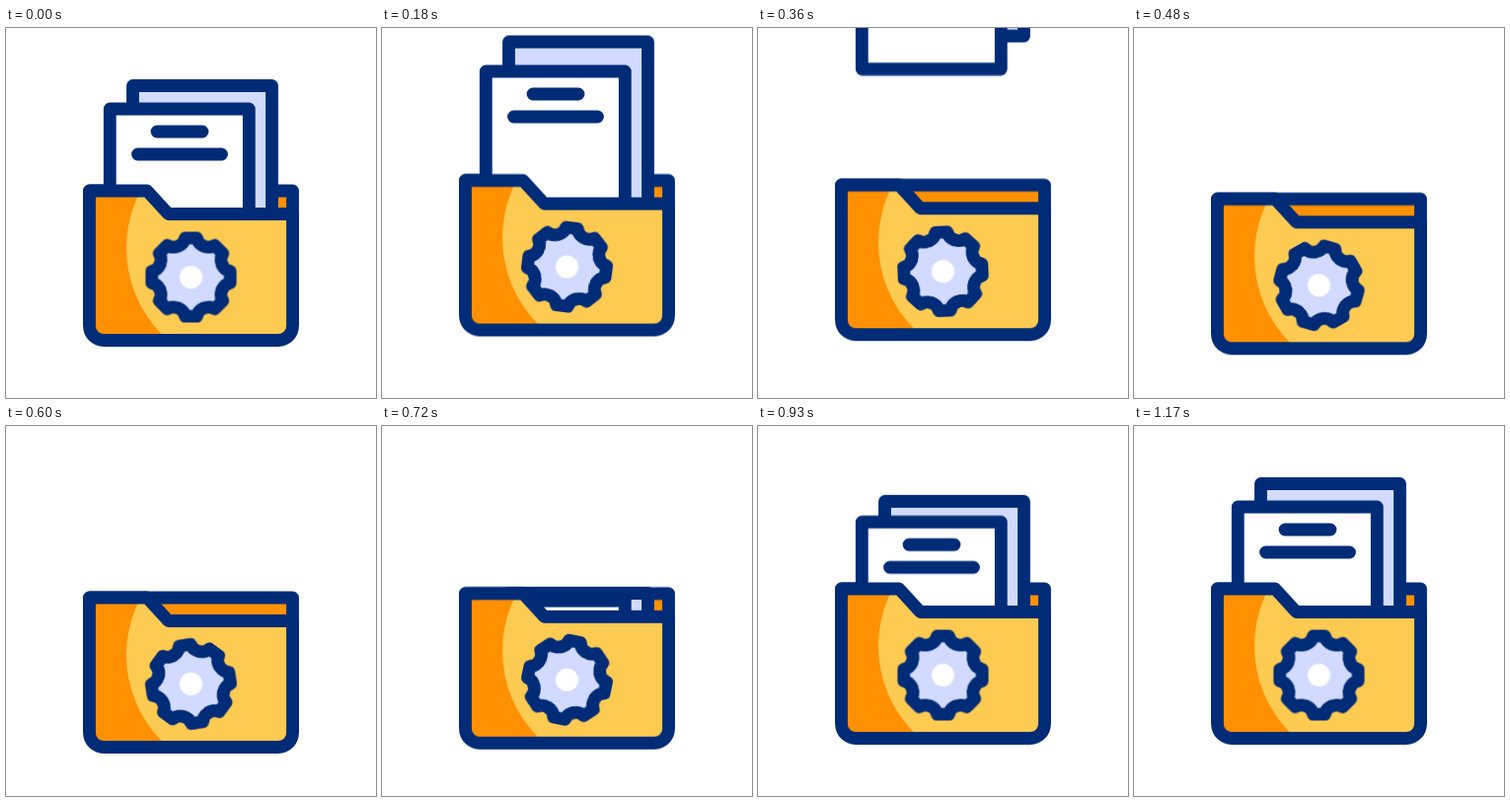
Animation of 375 by 375 pixels, one loop 1.32 s. Source, as an HTML page without scripts:

```html
<!DOCTYPE html>
<html lang="en">
<head>
<meta charset="utf-8">
<title>Folder</title>
<style>
  html, body { margin: 0; width: 100%; height: 100%; overflow: hidden; background: #fff; }
  svg { display: block; width: 100%; height: 100%; }

  .ink { stroke: #002b77; stroke-width: 12.8; stroke-linecap: round; stroke-linejoin: round; fill: none; }
  .orange { fill: #ff9100; }
  .yellow { fill: #fdca52; }
  .lilac { fill: #d2dbff; }
  .white { fill: #fff; }

  .folder { animation: bounce 1320ms cubic-bezier(.333, 0, .667, 1) infinite; }
  .paper { --k: 1; animation: fly 1320ms linear infinite; }
  .far { --k: 1.167; }
  .gear { animation: spin 1320ms linear infinite; }

  @keyframes bounce {
    0%, 2.27%, 68.56%, 100% { transform: translateY(0); }
    19.32% { transform: translateY(-14px); }
    39.77% { transform: translateY(10px); }
  }

  /* leaves through the top, then rises again from inside the folder */
  @keyframes fly {
    0% { transform: translateY(0); }
    2.27% { transform: translateY(0); animation-timing-function: cubic-bezier(.35, 0, .68, .31); }
    27.27% { transform: translateY(calc(var(--k) * -199px)); }
    34.09%, 44.31% { transform: translateY(calc(var(--k) * -320px)); }
    44.32% { transform: translateY(calc(var(--k) * 204px)); animation-timing-function: cubic-bezier(.32, .84, .667, 1); }
    84.09%, 100% { transform: translateY(0); }
  }

  @keyframes spin {
    0% { transform: rotate(0deg); }
    2.27% { transform: rotate(0deg); animation-timing-function: cubic-bezier(.6, 0, .9, .6); }
    13.64% { transform: rotate(7deg); animation-timing-function: cubic-bezier(.33, .15, .67, .6); }
    27.27% { transform: rotate(87deg); }
    36.36% { transform: rotate(150deg); }
    54.55% { transform: rotate(281deg); animation-timing-function: cubic-bezier(.3, .45, .6, 1); }
    70.45%, 100% { transform: rotate(360deg); }
  }
</style>
</head>
<body>
<svg viewBox="0 0 375 375">
  <defs>
    <path id="front" d="M84.5 165H143L164.5 188.5H290.5V302A14.5 14.5 0 0 1 276 316.5H99A14.5 14.5 0 0 1 84.5 302Z"/>
    <path id="tooth" d="M-13 -31.4Q-9.3 -32.9 -7.6 -35.5L-5.8 -39.7H5.8L7.6 -35.5Q9.3 -32.9 13 -31.4"/>
    <g id="pair">
      <use href="#tooth"/>
      <use href="#tooth" transform="rotate(45)"/>
    </g>
    <clipPath id="inFront"><use href="#front"/></clipPath>
    <clipPath id="pocket"><rect width="375" height="290"/></clipPath>
  </defs>

  <g class="folder">
    <path class="ink orange" d="M84.5 165H290.5V300H84.5Z"/>
  </g>

  <g clip-path="url(#pocket)">
    <g class="paper far">
      <rect class="ink lilac" x="128.5" y="58.5" width="141" height="183.5"/>
    </g>
    <g class="paper">
      <rect class="ink white" x="105.3" y="82" width="141" height="160"/>
      <path class="ink" d="M153 105H199M133.5 128H218.5"/>
    </g>
  </g>

  <g class="folder">
    <use href="#front" class="orange"/>
    <circle class="yellow" cx="246" cy="223" r="124" clip-path="url(#inFront)"/>
    <use href="#front" class="ink"/>
    <g transform="translate(187.5 252.5)">
      <g class="gear">
        <circle class="lilac" r="34"/>
        <g class="ink">
          <use href="#pair"/>
          <use href="#pair" transform="rotate(90)"/>
          <use href="#pair" transform="rotate(180)"/>
          <use href="#pair" transform="rotate(270)"/>
        </g>
        <circle class="white" r="11.5"/>
      </g>
    </g>
  </g>
</svg>
</body>
</html>
```
